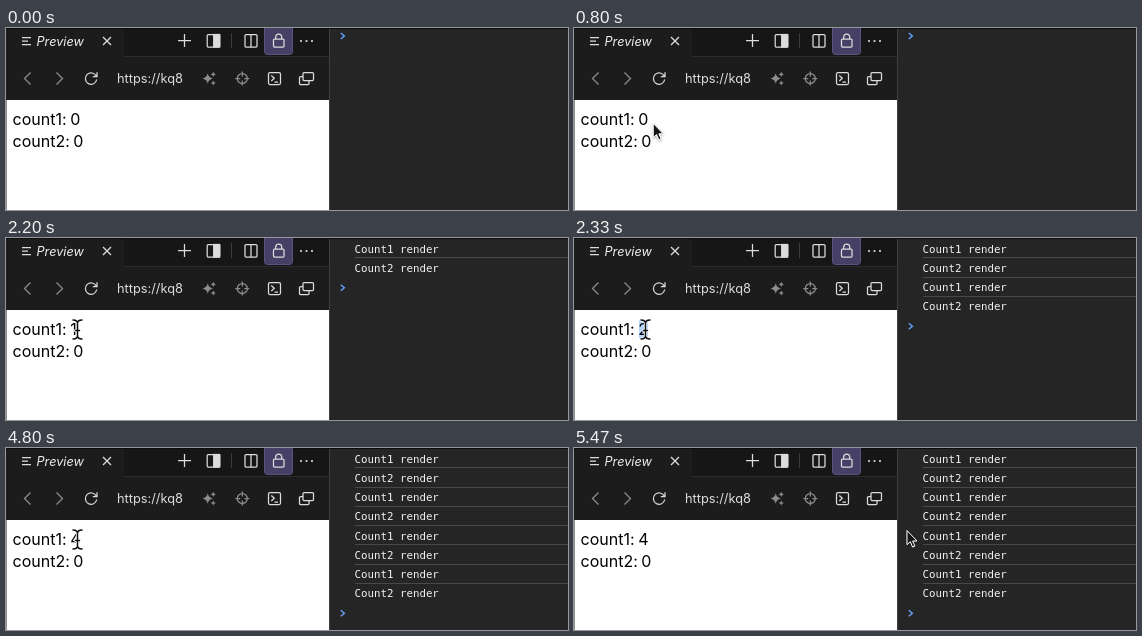
Animation of 562x182 px, one loop 6.93 s. Source, as an HTML page:

```html
<!DOCTYPE html>
<html lang="en">
<head>
<meta charset="utf-8">
<title>Count renders</title>
<style>
  html, body { margin: 0; width: 100%; height: 100%; overflow: hidden; background: #252525; }
  svg { display: block; width: 562px; height: 182px; }
  text { font-family: Inter, "Open Sans", sans-serif; font-variant-ligatures: no-contextual; }
  .page { font-size: 16px; fill: #000; }
  .log text { font: 10.77px "DejaVu Sans Mono", monospace; fill: #f2f2f2; }
  .icon { fill: none; stroke: #dcdcdc; stroke-width: 1.25; }
  .dim { stroke: #8c8c8c; }
</style>
</head>
<body>
<svg viewBox="0 0 562 182">
  <defs>
    <filter id="shadow" x="-50%" y="-50%" width="200%" height="200%">
      <feDropShadow dx="0" dy="1" stdDeviation="1" flood-opacity=".4"/>
    </filter>
    <path id="star" d="M0-5.2Q.9-.9 5.2 0Q.9 .9 0 5.2Q-.9 .9-5.2 0Q-.9-.9 0-5.2Z"/>
    <path id="stem" d="M67 82Q71.5 82 71.5 85.5Q71.5 82 76 82M71.5 85.5V97.5M67 101Q71.5 101 71.5 97.5Q71.5 101 76 101M69.5 92.5H73.5"/>
  </defs>

  <!-- Panels -->
  <rect width="562" height="182" fill="#252525"/>
  <rect width="323" height="182" fill="#1c1c1c"/>
  <rect x="118" width="205" height="28" fill="#161616"/>
  <path d="M118 28.5H323" stroke="#2b2b2b"/>
  <path d="M323.5 0V182" stroke="#404040"/>
  <rect x=".5" y="72" width="322.5" height="110" fill="#fff"/>
  <path d="M0 .5H562" stroke="#0c0c0c"/>

  <!-- Tab bar -->
  <rect x="258.5" y="-3.5" width="28" height="30" rx="3" fill="#463f66" stroke="#5b5480"/>
  <path class="icon" d="M16 9.5H25M16 13H22M16 16.5H25M97 9L105 17M105 9L97 17M172 12.5H185M178.5 6V19"/>
  <g class="icon">
    <rect x="201.2" y="6.5" width="12.5" height="12.5" rx="1"/>
    <rect x="207.7" y="6.5" width="6" height="12.5" fill="#dcdcdc"/>
    <rect x="239" y="6.5" width="12" height="12.5" rx="1"/>
    <path d="M245 6.5V19"/>
    <rect x="267.5" y="11" width="10.5" height="8" rx="1"/>
    <path d="M269.7 11V9a3 3 0 0 1 6 0V11"/>
  </g>
  <path d="M225.5 5V20" stroke="#3c3c3c"/>
  <g fill="#dcdcdc">
    <circle cx="295" cy="13" r="1.1"/><circle cx="300.5" cy="13" r="1.1"/><circle cx="306" cy="13" r="1.1"/>
  </g>
  <text x="30.5" y="17.5" font-size="12.7" font-style="italic" fill="#f0f0f0">Preview</text>

  <!-- Toolbar -->
  <path class="icon dim" d="M24.5 44.5L18.5 50.5L24.5 56.5M50.5 44.5L56.5 50.5L50.5 56.5"/>
  <path class="icon" d="M90.3 48.3A5.7 5.7 0 1 0 90.7 51.5M91 44.3V48.5H86.8"/>
  <text x="111" y="55.3" font-size="12.8" fill="#dedede">https://kq8</text>
  <g fill="#8c8c8c">
    <use href="#star" transform="translate(201.7 50.5)"/>
    <use href="#star" transform="translate(207.3 46.3) scale(.5)"/>
    <use href="#star" transform="translate(207.3 55) scale(.5)"/>
  </g>
  <g class="icon dim">
    <circle cx="236.3" cy="50.5" r="5"/>
    <path d="M236.3 43.5V48.5M236.3 52.5V57.5M229.3 50.5H234.3M238.3 50.5H243.3"/>
  </g>
  <g class="icon">
    <rect x="262.5" y="44.5" width="12" height="12" rx="1.5"/>
    <path d="M265.3 47.5L268.3 50.3L265.3 53M268.5 54H272"/>
    <path d="M297 48.5H294.5a1 1 0 0 0-1 1V55.5a1 1 0 0 0 1 1H302a1 1 0 0 0 1-1V53"/>
    <rect x="297" y="44.5" width="10.5" height="8" rx="1"/>
  </g>

  <!-- Page -->
  <rect id="mark" x="65" y="81.5" width="9" height="18.5" fill="#b4d5fb"/>
  <text class="page" x="6.6" y="96.7">count1:</text>
  <text class="page" id="count" x="64.3" y="96.7">0</text>
  <text class="page" x="6.6" y="119.3">count2:</text>
  <text class="page" x="67.3" y="119.3">0</text>

  <!-- Console -->
  <g class="log" id="log"></g>
  <path id="prompt" d="M334.8-3L338.3 0L334.8 3" fill="none" stroke="#669df6" stroke-width="1.5"/>

  <!-- Pointers -->
  <path id="arrow" d="M0 0V14.2L3.3 11.2L5.6 16.5L7.9 15.6L5.6 10.5H10Z" fill="#151515" stroke="#fff" filter="url(#shadow)"/>
  <g id="beam" fill="none" stroke-linecap="round">
    <use href="#stem" stroke="#fff" stroke-width="3.2"/>
    <use href="#stem" stroke="#111" stroke-width="1.5"/>
  </g>
</svg>
<script>
const LOOP = 6930, PITCH = 19.25;
const CLICKS = [2200, 2330, 3670, 4800];
const $ = id => document.getElementById(id);
const show = (el, on) => el.setAttribute("visibility", on ? "visible" : "hidden");

$("log").innerHTML = Array.from({ length: 8 }, (_, i) => {
  const y = i * PITCH;
  const rule = i ? `<path d="M349 ${Math.round(y) + 0.5}H562" stroke="#484848"/>` : "";
  return `<g>${rule}<text x="348.6" y="${y + 14.5}">Count${i % 2 + 1} render</text></g>`;
}).join("");
const rows = [...$("log").children];

// Arrow tip, or null while the arrow is hidden
function arrowAt(t) {
  if (t < 200) return null;
  if (t < 270) return [100, 144];
  if (t < 470) return [95, 119];
  if (t < 1670) {
    const step = Math.min(10, Math.floor((t - 463) / 66.7));
    if (!step) return [94, 113];
    const p = (step - 1) / 9, ease = p * (2 - p);
    return [91.7 - 18 * ease, 105.7 - 15 * ease];
  }
  if (t < 5330) return null;
  if (t < 5400) return [150, 72];
  if (t < 5470) return [275, 64];
  return [333, 82.5];
}

function draw(t) {
  const count = CLICKS.filter(c => t >= c).length;
  $("count").textContent = count;
  rows.forEach((row, i) => show(row, i < count * 2));
  $("prompt").setAttribute("transform", `translate(0 ${count ? count * 2 * PITCH + 11.3 : 8})`);
  show($("mark"), count === 2);
  show($("beam"), t >= 2200 && t < 5330);
  const tip = arrowAt(t);
  show($("arrow"), tip);
  if (tip) $("arrow").setAttribute("transform", `translate(${tip})`);
}

const start = performance.now();
function frame() {
  draw((performance.now() - start) % LOOP);
  requestAnimationFrame(frame);
}
frame();
</script>
</body>
</html>
```
